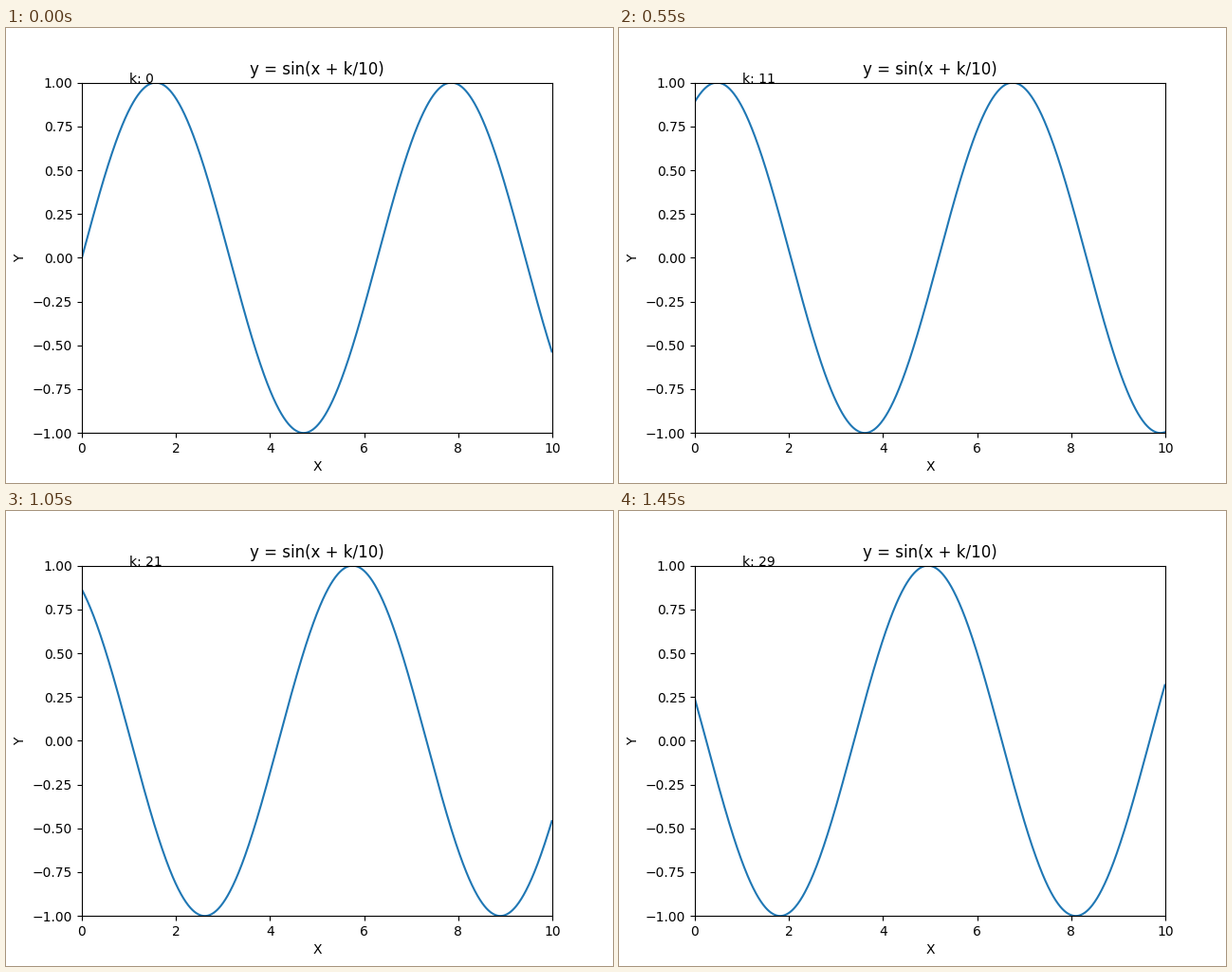
Write a matplotlib script that moves like this. It is 640 px wide and 480 px high and loops after 1500 ms.

```python
import numpy as np
import matplotlib.pyplot as plt
from matplotlib.animation import FuncAnimation

FRAMES = 30
INTERVAL = 50  # ms

fig, ax = plt.subplots(figsize=(6.4, 4.8), dpi=100)
ax.set(xlim=(0, 10), ylim=(-1, 1), xlabel="X", ylabel="Y",
       title="y = sin(x + k/10)")

x = np.arange(0, 10, 0.01)
line, = ax.plot(x, np.sin(x))
label = ax.text(1, 1, "k: 0")


def update(k):
    line.set_ydata(np.sin(x + k / 10))
    label.set_text(f"k: {k}")
    return line, label


anim = FuncAnimation(fig, update, frames=FRAMES, interval=INTERVAL,
                     repeat=True, repeat_delay=0)
plt.show()
```
